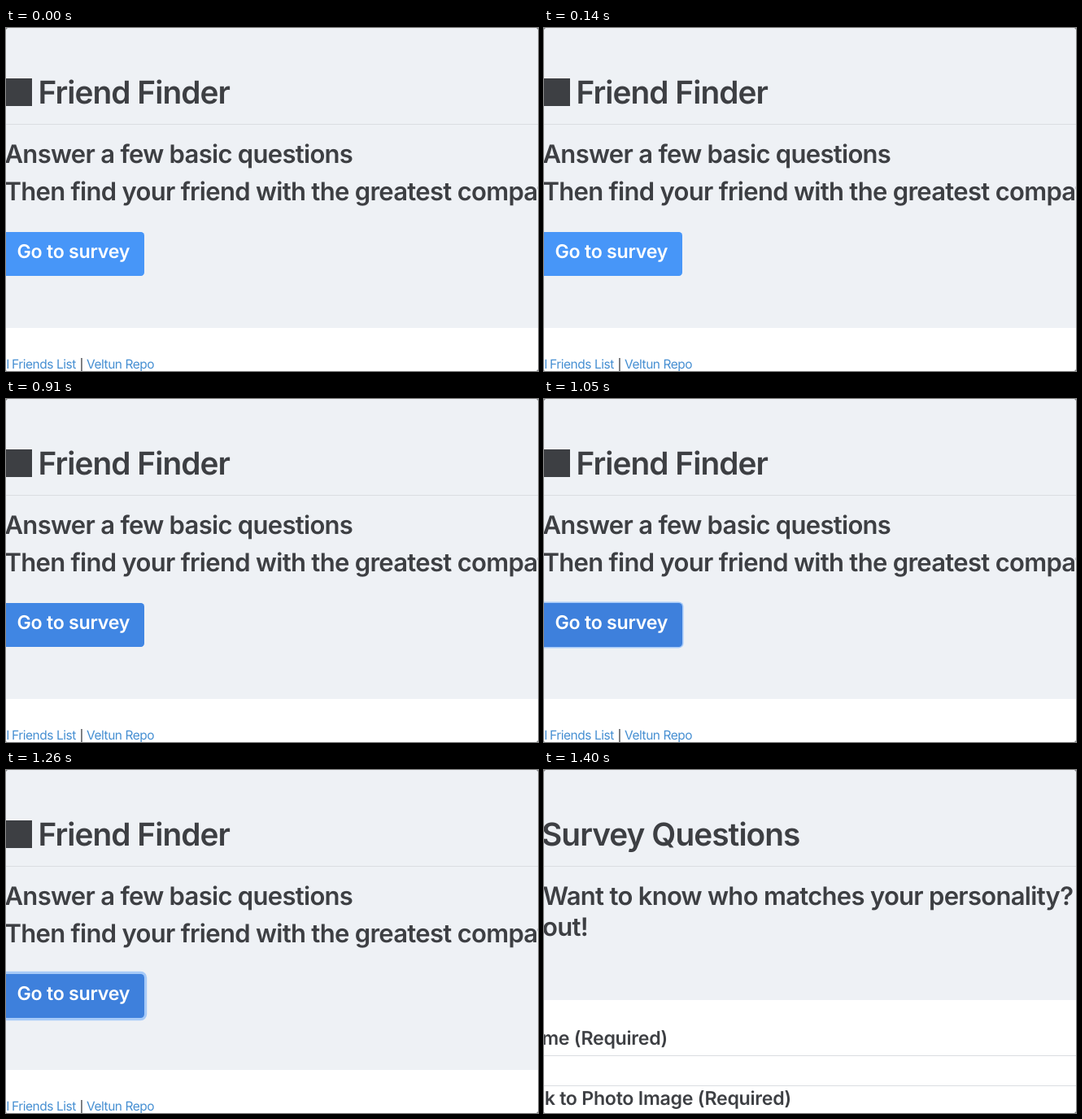
These frames come from a looping animation (654 by 422 pixels, 2730 ms). An HTML page:

```html
<!DOCTYPE html>
<html lang="en">
<head>
<meta charset="utf-8">
<title>Friend Finder</title>
<style>
  html, body { margin: 0; width: 100%; height: 100%; overflow: hidden; background: #fff; }
  svg { display: block; width: 654px; height: 422px; }
  text {
    font-family: Inter, "Liberation Sans", sans-serif;
    font-weight: 600;
    font-optical-sizing: none;
    fill: #3d3f43;
    text-rendering: geometricPrecision;
  }
  .h1 { font-size: 38.8px; letter-spacing: -.024em; }
  .h2 { font-size: 31px; letter-spacing: -.0225em; }
  .h4 { font-size: 23.2px; letter-spacing: -.012em; }
  .link { font-size: 15.5px; font-weight: 400; letter-spacing: -.03em; fill: #468fd2; }
  .end { text-anchor: end; }
  .panel { fill: #eef1f5; }
  .rule { fill: #dadde1; }
</style>
</head>
<body>
<svg viewBox="0 0 654 422" xmlns="http://www.w3.org/2000/svg">
  <rect width="654" height="422" fill="#fff"/>

  <g id="home">
    <rect class="panel" width="654" height="369"/>
    <rect class="rule" y="118" width="654" height="1"/>
    <rect x="-2" y="62" width="34" height="34" fill="#3d3f43"/>
    <text class="h1" x="39.5" y="92.6">Friend Finder</text>
    <text class="h2" x="-1.5" y="166">Answer a few basic questions</text>
    <text class="h2" x="-1.5" y="212">Then find your friend with the greatest compatibility</text>
    <rect id="ring" fill="#a6caf8"/>
    <rect id="button" x="-10" y="251" width="180" height="54" rx="4.5"/>
    <text class="h4" x="13.5" y="283" style="fill:#fff">Go to survey</text>
    <text class="link end" x="4" y="419">API</text>
    <text class="link" x="7" y="419">Friends List</text>
    <rect x="92.3" y="406" width="1.3" height="16" fill="#3d3f43"/>
    <text class="link" x="99" y="419">Veltun Repo</text>
  </g>

  <g id="survey">
    <rect class="panel" width="654" height="283"/>
    <rect class="rule" y="118" width="654" height="1"/>
    <text class="h1" x="-3" y="92.6">Survey Questions</text>
    <text class="h2" x="-1.5" y="166">Want to know who matches your personality?</text>
    <text class="h2" x="-2" y="204">out!</text>
    <text class="h4 end" x="152" y="338">Name (Required)</text>
    <rect class="rule" y="351" width="654" height="1"/>
    <rect class="rule" y="388" width="654" height="1"/>
    <text class="h4 end" x="304" y="412">Link to Photo Image (Required)</text>
  </g>

  <path fill="#85888c" d="M0 0h2l-2 2zM654 0h-2l2 2zM654 422h-2l2-2zM0 422h1l-1-1z"/>
</svg>
<script>
  const LOOP = 2730, STEP = 70, PAGE_AT = 1330;
  const [home, survey, button, ring] =
    ["home", "survey", "button", "ring"].map(id => document.getElementById(id));
  const idle = [71, 150, 248], hover = [62, 128, 220];

  // Eased progress from 0 to 1 between two times
  function ease(t, from, to) {
    const p = Math.min(1, Math.max(0, (t - from) / (to - from)));
    return p * p * (3 - 2 * p);
  }

  function setAttrs(el, attrs) {
    for (const name in attrs) el.setAttribute(name, attrs[name]);
  }

  function draw(time) {
    const t = Math.floor((time % LOOP) / STEP) * STEP;
    const onSurvey = t >= PAGE_AT;
    home.style.display = onSurvey ? "none" : "";
    survey.style.display = onSurvey ? "" : "none";

    const heat = ease(t, 770, 980);
    const color = idle.map((c, i) => Math.round(c + (hover[i] - c) * heat));
    button.setAttribute("fill", `rgb(${color})`);

    const spread = 3.2 * ease(t, 980, 1120);
    setAttrs(ring, {
      x: -10 - spread, y: 251 - spread,
      width: 180 + 2 * spread, height: 54 + 2 * spread,
      rx: 4.5 + spread
    });
  }

  const start = performance.now();
  function tick() {
    draw(performance.now() - start);
    requestAnimationFrame(tick);
  }
  tick();
</script>
</body>
</html>
```
